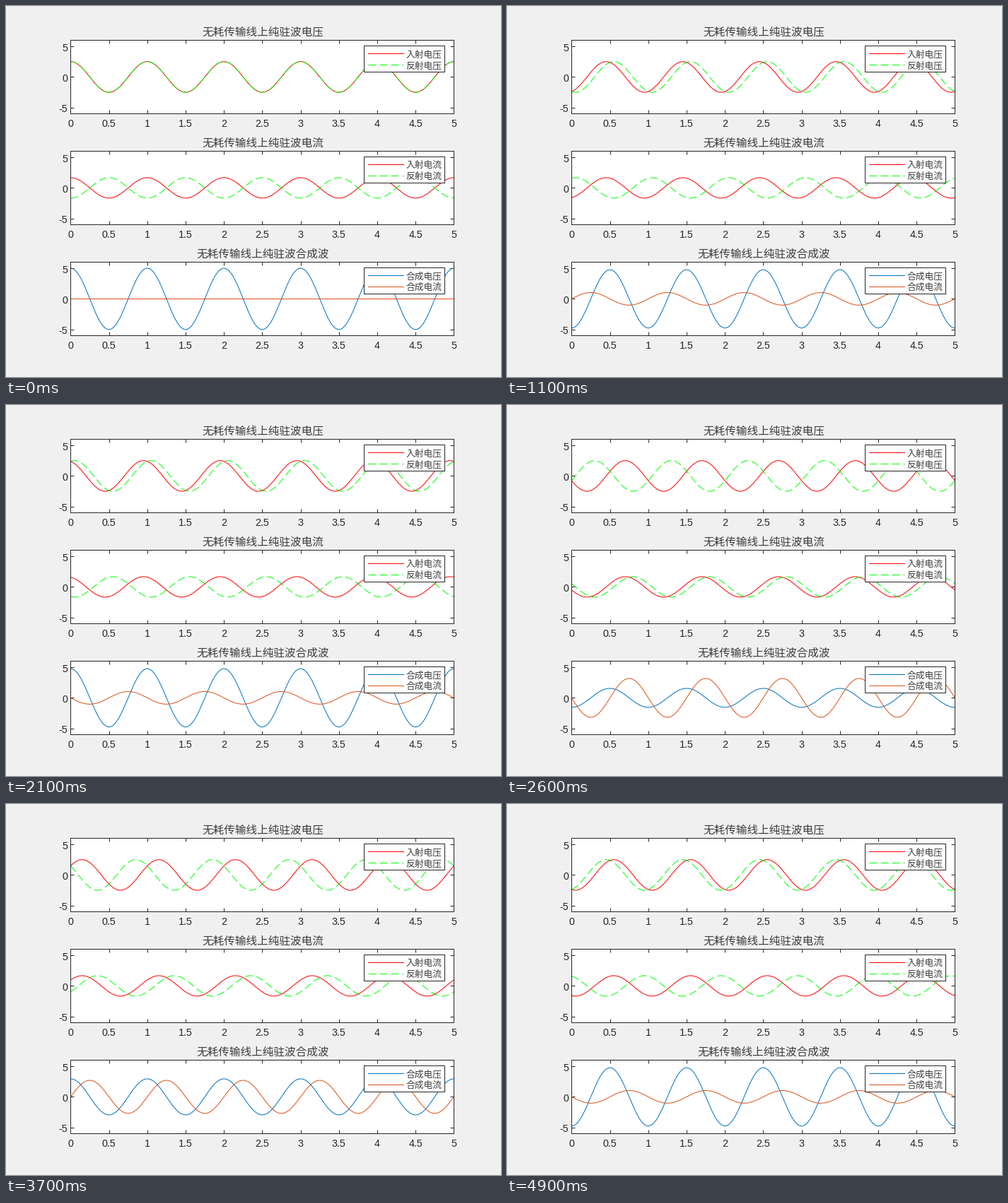
Write a matplotlib script that moves like this. It is 700 px wide and 525 px high and loops after 5000 ms.

```python
import numpy as np
import matplotlib.pyplot as plt
from matplotlib.animation import FuncAnimation
from matplotlib.lines import Line2D
from matplotlib.patches import Rectangle
from matplotlib.transforms import Affine2D, ScaledTranslation

W, H, DPI = 700, 525, 100
FRAMES, INTERVAL = 50, 100
PX = 72 / DPI  # points per pixel

RED, GREEN = "#ff0000", "#00ff00"
BLUE, ORANGE = "#0072bd", "#d95319"
INK, TEXT_INK = "#262626", "#3c3c3c"
CJK = "Noto Sans CJK JP"
SOLID, DASHED = "-", (0, (11 * PX, 5 * PX))

# Just below the half pixel, so that straight lines snap to the intended row.
SNAP = 0.4
LEFT, RIGHT, HEIGHT = 91 + SNAP, 633 + SNAP, 104
V_AMP, I_AMP = 2.5, 2.5 / 1.5
x = np.linspace(0, 5, 1001)

plt.rcParams["lines.scale_dashes"] = False
fig = plt.figure(figsize=(W / DPI, H / DPI), dpi=DPI, facecolor="#f0f0f0")
TOP_LEFT_PX = Affine2D().scale(1, -1).translate(0, H)


def put(artist):
    artist.set_transform(TOP_LEFT_PX)
    fig.add_artist(artist)


def put_text(px, py, text, size, **kwargs):
    fig.text(px / W, 1 - py / H, text, family=CJK, size=size * PX,
             color=TEXT_INK, va="center_baseline", **kwargs)


def add_legend(top, entries):
    put(Rectangle((506 + SNAP, top + 8 + SNAP), 114, 37,
                  fc="white", ec=INK, lw=PX, zorder=5))
    for row, (label, color, style) in enumerate(entries):
        y = top + 19 + 16 * row
        put(Line2D([512, 562], [y + SNAP - row * 0.1] * 2, color=color, lw=PX,
                   ls=style, dash_capstyle="butt", zorder=6))
        put_text(565.5, y + 0.3, label, 12.75, zorder=6)


def add_panel(top, title, curves, labels):
    ax = fig.add_axes([LEFT / W, 1 - (top + SNAP + HEIGHT) / H,
                       (RIGHT - LEFT) / W, HEIGHT / H])
    ax.set(xlim=(0, 5), ylim=(-6, 6))
    ticks = np.arange(0, 5.1, 0.5)
    ax.set_xticks(ticks, [f"{t:g}" for t in ticks])
    ax.set_yticks([-5, 0, 5], ["-5", "0", "5"])
    ax.tick_params(direction="in", top=True, right=True, length=5 * PX,
                   width=PX, color=INK, labelcolor=INK, pad=4 * PX,
                   labelsize=14.2 * PX, labelfontfamily="Liberation Sans")
    ax.tick_params(axis="x", pad=8 * PX)
    one_down = ScaledTranslation(0, -1 / DPI, fig.dpi_scale_trans)
    for label in ax.get_yticklabels():
        label.set_transform(label.get_transform() + one_down)
    for spine in ax.spines.values():
        spine.set(linewidth=PX, color=INK)
    put_text((LEFT + RIGHT) / 2 + 0.5, top - 13, title, 15.6, ha="center")
    add_legend(top, [(text, *curve) for text, curve in zip(labels, curves)])
    return [ax.plot(x, 0 * x, color=color, lw=PX, ls=style,
                    dash_capstyle="butt")[0] for color, style in curves]


wave_pair = [(RED, SOLID), (GREEN, DASHED)]
sum_pair = [(BLUE, SOLID), (ORANGE, SOLID)]
lines = (
    add_panel(48, "无耗传输线上纯驻波电压", wave_pair, ["入射电压", "反射电压"])
    + add_panel(205, "无耗传输线上纯驻波电流", wave_pair, ["入射电流", "反射电流"])
    + add_panel(362, "无耗传输线上纯驻波合成波", sum_pair, ["合成电压", "合成电流"])
)


def update(frame):
    shift = 0.05 * frame
    incident = np.cos(2 * np.pi * (x + shift))
    reflected = np.cos(2 * np.pi * (x - shift))
    waves = (V_AMP * incident, V_AMP * reflected,
             I_AMP * incident, -I_AMP * reflected,
             V_AMP * (incident + reflected), I_AMP * (incident - reflected))
    for line, wave in zip(lines, waves):
        line.set_ydata(wave)
    return lines


anim = FuncAnimation(fig, update, frames=FRAMES, interval=INTERVAL, repeat=True)
plt.show()
```
